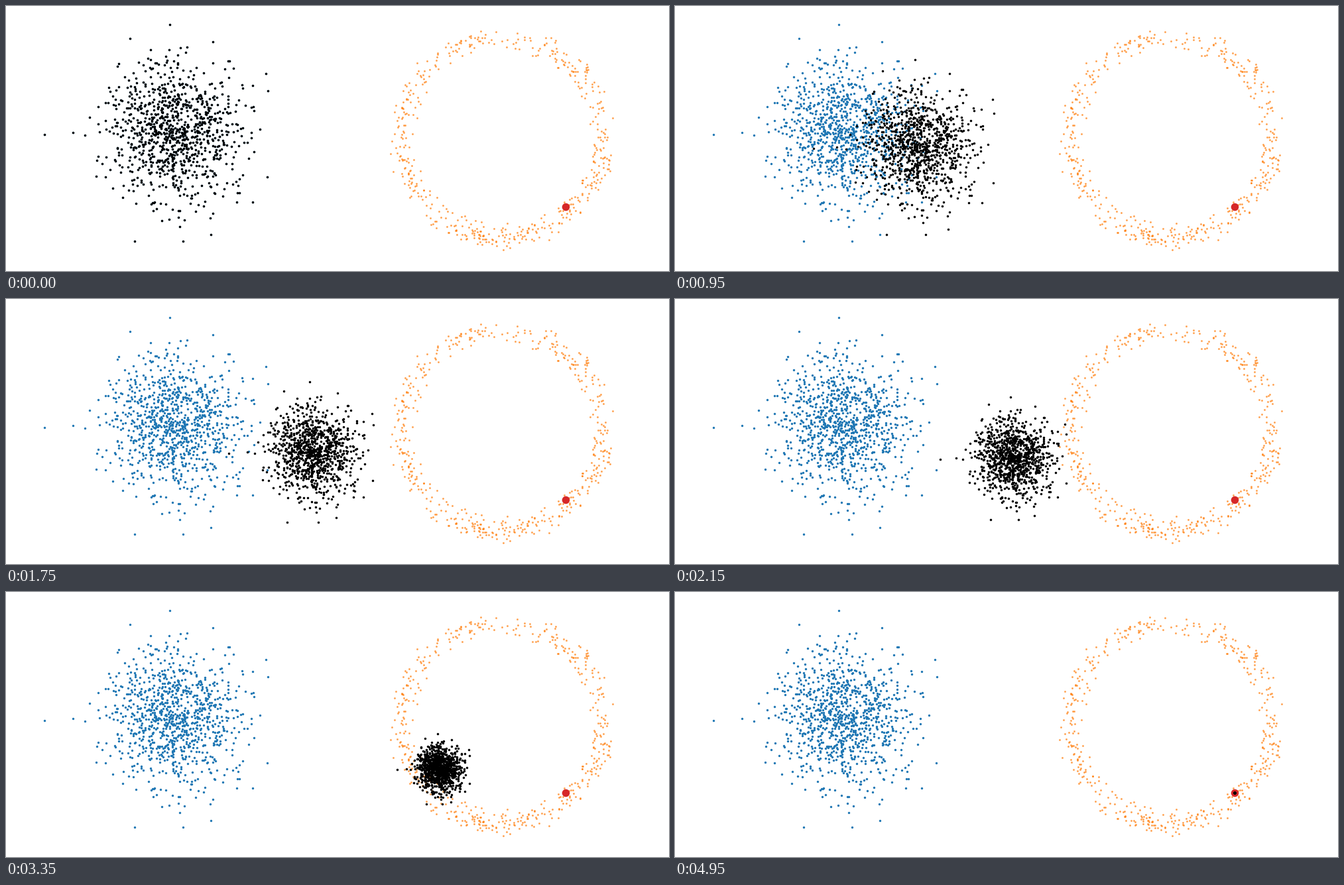
A matplotlib script for the animation above (5000 ms loop, 1000 px wide and 400 px high).

```python
import numpy as np
import matplotlib.pyplot as plt
from matplotlib.animation import FuncAnimation

WIDTH, HEIGHT, DPI = 1000, 400, 100
FRAMES, INTERVAL = 100, 50
N_CLOUD, N_RING = 1000, 500
CLOUD_CENTER, CLOUD_SIGMA = (254, 195), 51
RING_CENTER, RING_RADIUS, RING_SIGMA = (748, 198), 151, 9.5
TARGET = np.array([844.4, 303.4])

# Key points that fix the outline of the cloud.
EXTREMES = [(247, 28), (187, 49), (312, 54), (58.4, 194), (101, 191),
            (392, 102), (395, 128), (394, 258), (372, 296),
            (194, 355), (267, 355), (309, 345)]


def normal_2d(rng, count, sigma, limit):
    """Gaussian offsets, without those farther out than limit sigmas."""
    offsets = rng.normal(0, sigma, (2 * count, 2))
    return offsets[np.hypot(*offsets.T) < limit * sigma][:count]


def make_cloud(rng):
    body = normal_2d(rng, N_CLOUD - len(EXTREMES), CLOUD_SIGMA, 2.75)
    return np.vstack([EXTREMES, CLOUD_CENTER + body])


def make_ring(rng):
    angle = rng.uniform(0, 2 * np.pi, N_RING)
    circle = RING_RADIUS * np.column_stack([np.cos(angle), np.sin(angle)])
    return RING_CENTER + circle + normal_2d(rng, N_RING, RING_SIGMA, 2.4)


def dots(points, diameter, color, **style):
    size = (diameter * 72 / DPI) ** 2
    return ax.scatter(*points.T, s=size, c=color, linewidths=0, **style)


rng = np.random.default_rng(7)
cloud = make_cloud(rng)

fig = plt.figure(figsize=(WIDTH / DPI, HEIGHT / DPI), dpi=DPI, facecolor="white")
ax = fig.add_axes([0, 0, 1, 1])
ax.set(xlim=(0, WIDTH), ylim=(HEIGHT, 0))
ax.axis("off")

dots(cloud, 3.4, "#1f77b4", zorder=1)
dots(make_ring(rng), 2.9, "#ff7f0e", alpha=0.7, zorder=2)
dots(TARGET[None], 11.6, "#d62728", zorder=3)
movers = dots(cloud, 3.5, "black", zorder=4)


def update(frame):
    t = frame / (FRAMES - 1)
    movers.set_offsets((1 - t) * cloud + t * TARGET)
    return movers,


anim = FuncAnimation(fig, update, frames=FRAMES, interval=INTERVAL,
                     repeat=True, repeat_delay=0)
plt.show()
```
